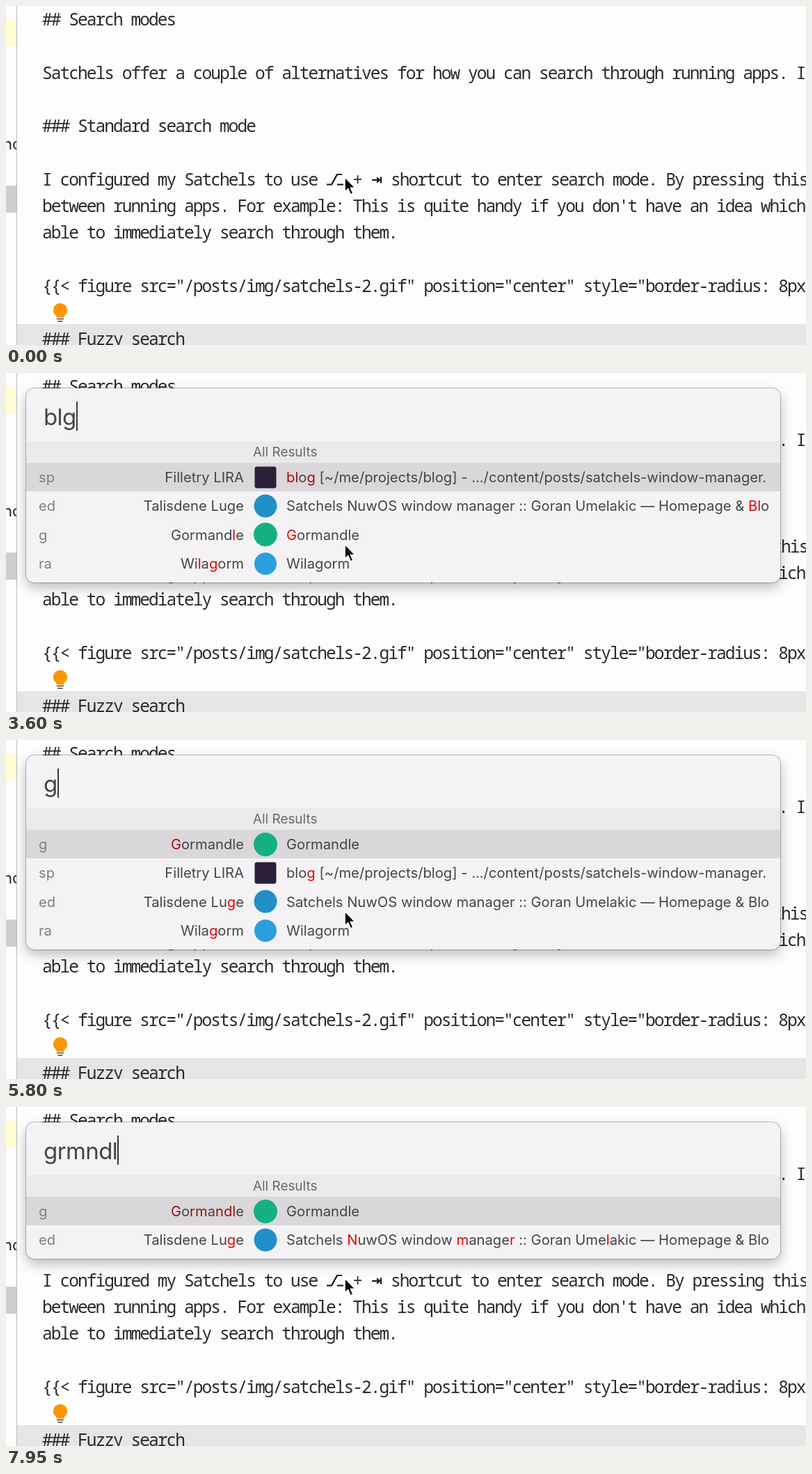
An HTML page for the animation above (8 s loop, 1150 by 487 pixels).

```html
<!DOCTYPE html>
<html lang="en">
<head>
<meta charset="utf-8">
<title>Window search</title>
<style>
  html, body { margin: 0; width: 100%; height: 100%; overflow: hidden; }
  #stage { position: relative; width: 1150px; height: 487px; overflow: hidden; background: #fefdfe; }
  #stage div, #stage pre, #stage > svg { position: absolute; }

  #side { left: 0; top: 0; width: 15px; height: 487px; overflow: hidden; border-right: 1px solid #bcbabc; }
  #side div { left: 0; width: 15px; }
  #side .label { left: -4px; top: 184px; width: 60px; font: 22px/28px Inter, sans-serif; color: #222; }
  #line { left: 16px; top: 457px; width: 1134px; height: 30px; background: #e5e4e6; }

  #doc {
    left: 52px; top: 0; margin: 0; color: #2b2a2c;
    font: 300 24.5px/38.25px "Noto Sans Mono", "DejaVu Sans Mono", monospace;
    letter-spacing: calc(12.75px - 1ch);
    font-variant-ligatures: none;
  }
  #doc svg { height: 20px; vertical-align: -1px; fill: none; stroke: #111; stroke-width: 2.2; }

  #panel {
    left: 29px; top: 22px; width: 1084px; border-radius: 12px; overflow: hidden;
    background: #f4f2f5; color: #454447; font: 20.2px/41.4px Inter, sans-serif; white-space: pre;
    box-shadow: 0 0 0 1px rgba(0, 0, 0, .24), 0 7px 18px rgba(0, 0, 0, .27);
  }
  #query { left: 25px; top: 19px; height: 42px; font-size: 33px; line-height: 44px; letter-spacing: -.6px; }
  #caret { left: 100%; top: 0; width: 2px; height: 42px; background: #39383b; }
  #head { left: 0; top: 76px; width: 100%; height: 31px; background: #ebe9ec; }
  #head div { left: 326px; font-size: 18.9px; line-height: 32px; color: #69686b; }
  .row { left: 0; width: 100%; height: 41.4px; }
  .row.sel { background: #d9d7da; }
  .row .key { left: 18px; color: #807e81; }
  .row .app { right: 771px; }
  .row .title { left: 374px; width: 696px; overflow: hidden; }
  .row .icon { left: 343.5px; top: 50%; box-sizing: border-box; transform: translate(-50%, -50%); }
  .hit { color: #e00505; }
  .sel .hit { color: #9c1010; }
</style>
</head>
<body>
<div id="stage">
  <div id="side">
    <div style="top:20px;height:38px;background:#fdfcd3"></div>
    <div style="top:258px;height:39px;background:#cfcdcf"></div>
    <div class="label">no</div>
  </div>
  <div id="line"></div>
  <pre id="doc">## Search modes

Satchels offer a couple of alternatives for how you can search through running apps. I

### Standard search mode

I configured my Satchels to use <svg width="25.5" viewBox="0 0 25.5 20"><path d="M1 17.5h7L16 3h7M16 17.5h9"/></svg> + <svg width="16.5" viewBox="0 0 16.5 20"><path d="M2 11h10M9 7.5l4 3.5l-4 3.5M15 6.5v9"/></svg> shortcut to enter search mode. By pressing this
between running apps. For example: This is quite handy if you don't have an idea which
able to immediately search through them.

{{&lt; figure src="/posts/img/satchels-2.gif" position="center" style="border-radius: 8px

### Fuzzy search</pre>
  <svg style="left:66px;top:425px" width="24" height="31">
    <path d="M12 2a10 10 0 0 1 6.5 17.6q-1 1-1.3 2.9H6.8q-.3-1.9-1.3-2.9A10 10 0 0 1 12 2z" fill="#fb9502"/>
    <path d="M7 24.5h10M8.5 28h7" stroke="#6b6b6e" stroke-width="2"/>
  </svg>
  <div id="panel">
    <div id="query"><span id="typed"></span><div id="caret"></div></div>
    <div id="head"><div></div></div>
    <div id="rows" style="left:0;top:107px;width:100%"></div>
  </div>
  <svg style="left:483px;top:242px" width="24" height="34">
    <path d="M4 4v21l4.7-4.4 3.5 8.2 3.7-1.6-3.5-8H19z" fill="#0a0a0a" stroke="#fff" stroke-width="1.6" stroke-linejoin="round"/>
  </svg>
</div>
<script>
const LOOP = 8000, OPEN = 450, ROW = 41.4;

// key: [app, window title, icon size, icon colour, corner radius, border]
const apps = {
  k: ["Kap", "Kap", 28, "#fff", "50%", "#4aa5e6"],
  sp: ["Filletry LIRA", "blog [~/me/projects/blog] - .../content/posts/satchels-window-manager.", 31, "#2b2038", "3px"],
  ra: ["Wilagorm", "Wilagorm", 32, "#2b9fdd", "50%"],
  ed: ["Talisdene Luge", "Satchels NuwOS window manager :: Goran Umelakic — Homepage & Blo", 33, "#2190c8", "50%"],
  f: ["Fondly", "Fondly", 29, "#35a2f3", "2px"],
  n: ["Nibbs", "Nibbs", 28, "#fcf8e8", "2px", "#dccb8a"],
  br: ["iTerm2", "1. ped@macbookpro-ped: ~", 30, "#1a2122", "3px"],
  g: ["Gormandle", "Gormandle", 34, "#13b181", "50%"],
};

// Rows read key/hits in app/hits in title
const all = "k sp ra ed f n br g";
const b = "sp//0 ed//61 br//10";
const bl = "sp//0,1 ed//61,62 g/7 br//10 ra/2";

// [start, query, selected row, rows]
const states = [
  [OPEN, "", 1, all],
  [1700, "b", 0, b],
  [1900, "bl", 0, bl],
  [2600, "blg", 0, "sp//0,1,3 ed//61,62 g/7/0 ra/2,4"],
  [3900, "bl", 0, bl],
  [4250, "b", 0, b],
  [4550, "", 1, all],
  [5050, "", -1, all],
  [5800, "g", 0, "g/0 sp//3 ed/12 ra/4"],
  [5950, "gr", 0, "g/0,2 sp//3,12 ed/12/28 ra/4,6 br/3"],
  [6150, "grm", 0, "g/0,2,3 sp//3,12,62 ed/12/28 ra/4,6,7 br/3,4"],
  [7450, "grmn", 0, "g/0,2,3,5 ed/12/9,22,28"],
  [7650, "grmnd", 0, "g/0,2,3,5,6 ed/12/9,22,28"],
  [7800, "grmndl", 0, "g/0,2,3,5,6,7 ed/12/9,22,28,42"],
];

const $ = id => document.getElementById(id);
const panel = $("panel"), caret = $("caret"), rows = $("rows");

function add(parent, cls) {
  const el = document.createElement("div");
  el.className = cls;
  parent.append(el);
  return el;
}

function write(el, text, hits = "") {
  const marked = new Set(hits.split(",").filter(Boolean).map(Number));
  [...text].forEach((ch, i) => {
    if (!marked.has(i)) return el.append(ch);
    const span = document.createElement("span");
    span.className = "hit";
    span.textContent = ch;
    el.append(span);
  });
  el.normalize();
}

function show([, query, sel, list]) {
  const items = list.split(" ");
  $("typed").textContent = query;
  $("head").firstElementChild.textContent = query ? "All Results" : "All";
  panel.style.height = 113 + items.length * ROW + "px";
  rows.replaceChildren();
  items.forEach((item, i) => {
    const [key, appHits, titleHits] = item.split("/");
    const [app, title, size, fill, radius, edge] = apps[key];
    const row = add(rows, i === sel ? "row sel" : "row");
    row.style.top = i * ROW + "px";
    write(add(row, "key"), key);
    write(add(row, "app"), app, appHits);
    write(add(row, "title"), title, titleHits);
    Object.assign(add(row, "icon").style, {
      width: size + "px", height: size + "px", background: fill, borderRadius: radius,
      border: edge ? "1.5px solid " + edge : "none",
    });
  });
}

const clamp = v => Math.max(0, Math.min(1, v));
let shown = -1;

function frame() {
  const t = performance.now() % LOOP;
  const now = states.findLastIndex(s => s[0] <= t);
  panel.style.opacity = clamp((t - OPEN) / 250);
  if (now >= 0) {
    if (now !== shown) show(states[now]);
    // The blink restarts with every keystroke
    const key = states[now][2] < 0 ? now - 1 : now;
    const phase = (t - states[key][0]) % 1000;
    caret.style.opacity = phase < 700 ? clamp((600 - phase) / 150) : clamp((phase - 850) / 150);
  }
  shown = now;
  requestAnimationFrame(frame);
}
frame();
</script>
</body>
</html>
```
